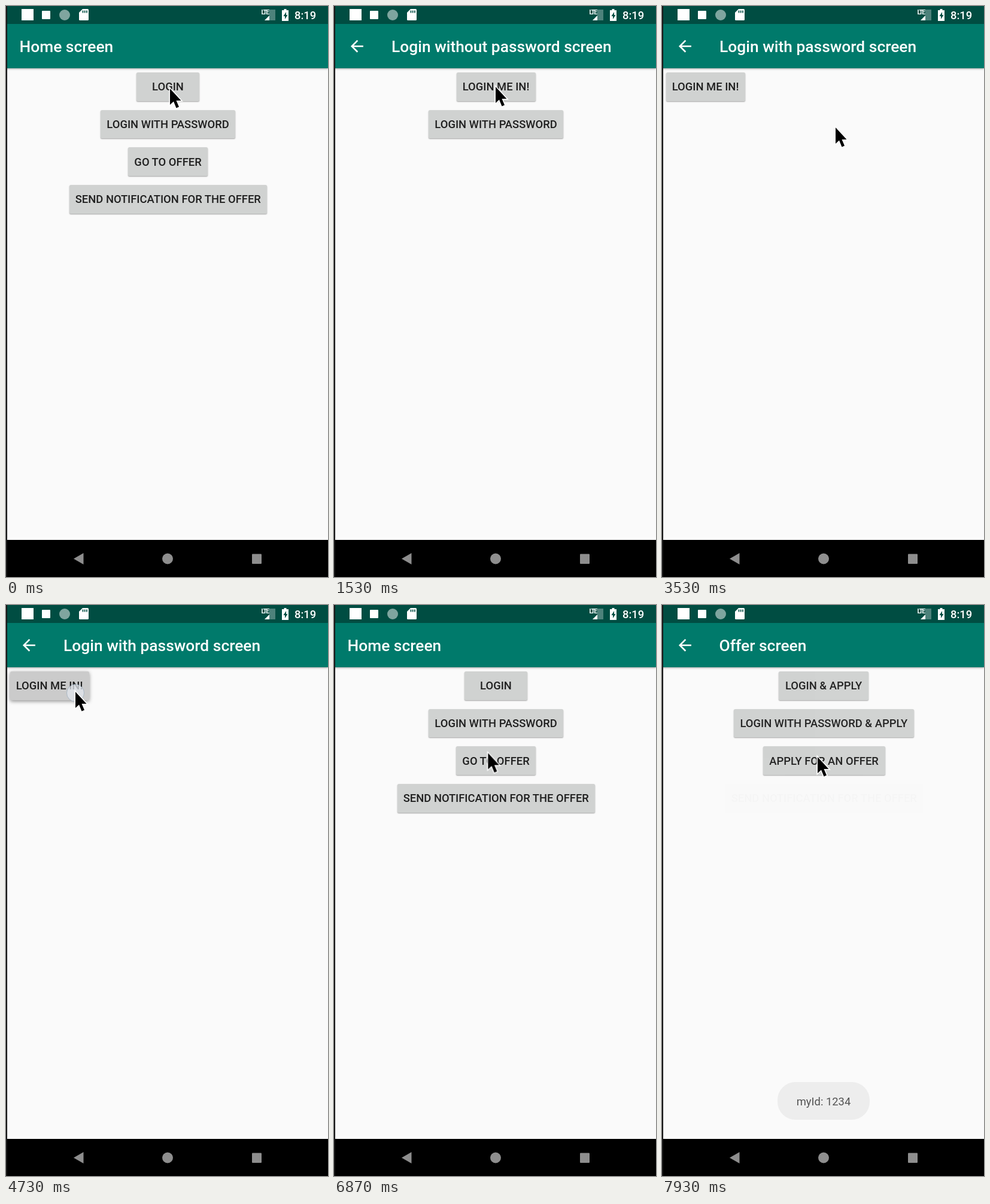
Recreate the animation shown at these times as an HTML page. Size 538 by 954 pixels, loop 8000 ms.

```html
<!DOCTYPE html>
<html lang="en">
<head>
<meta charset="utf-8">
<title>App navigation</title>
<style>
  @property --lift { syntax: "<number>"; inherits: true; initial-value: 1; }
  @property --bar-lift { syntax: "<number>"; inherits: true; initial-value: 1; }

  html, body { margin: 0; width: 100%; height: 100%; overflow: hidden; background: #fafafa; }
  #stage {
    position: relative; width: 538px; height: 954px; overflow: hidden;
    background: #fafafa; font-family: Roboto, sans-serif;
    animation: lift 8s step-end infinite;
  }
  #stage > * { position: absolute; }
  svg { left: 0; top: 0; }

  .header {
    left: 0; top: 30px; width: 538px; height: 74px; background: #007a6b;
    box-shadow: 0 1px 3px rgb(0 0 0 / calc(.36 * var(--bar-lift)));
  }

  /* Screens */
  .screen { inset: 0; animation: 8s linear infinite; }
  .home { animation-name: home; }
  .login { animation-name: login; }
  .password { animation-name: password; }
  .offer { animation-name: offer; }
  .button {
    --shadow: 0 1px 2px rgb(0 0 0 / calc(.36 * var(--lift)));
    position: absolute; left: var(--x); top: calc(111px + 62.7px * var(--row, 0));
    width: var(--w); height: 47.5px; border-radius: 2.6px;
    display: flex; align-items: center; justify-content: center;
    font-size: 18.4px; font-weight: 500; white-space: nowrap;
    color: #1f1f1f; background: #d0d2d1; box-shadow: var(--shadow);
  }
  .tapped { animation: press 8s step-end var(--at) infinite; }

  /* Titles */
  .titles text { font-size: 26.35px; font-weight: 500; fill: #fff; }
  .titles g { animation: 8s step-end infinite; }
  .titles .home { animation-name: home-title; }
  .titles .login { animation-name: login-title; }
  .titles .password { animation-name: password-title; }
  .titles .offer { animation-name: offer-title; }

  .toast {
    left: 193px; top: 797px; width: 154px; height: 63px; border-radius: 30px;
    display: flex; align-items: center; justify-content: center;
    font-size: 18.4px; color: #383838; background: #ebebeb;
    padding-top: 1px; box-sizing: border-box;
    animation: toast 8s linear infinite;
  }

  .cursor { left: 0; top: 0; animation: pointer 8s ease-in-out infinite; }
  .cursor svg { position: absolute; overflow: visible; }
  .touch { animation: touch 8s step-end infinite; }

  @keyframes lift {
    0% { --lift: 1; --bar-lift: 1; }
    11.375% { --lift: 0; --bar-lift: 1; }
    16% { --lift: 1; --bar-lift: 1; }
    35.75% { --lift: 0; --bar-lift: 0; }
    40.25% { --lift: 1; --bar-lift: 1; }
    59.75% { --lift: 0; --bar-lift: 0; }
    64.25% { --lift: 1; --bar-lift: 1; }
    94.625% { --lift: 0; --bar-lift: 0; }
    98.9%, 100% { --lift: 1; --bar-lift: 1; }
  }
  @keyframes home {
    0%, 11.375%, 64.75%, 94.625% { opacity: 1; animation-timing-function: cubic-bezier(.37, 0, .63, 1); }
    16.375%, 59.75% { opacity: 0; animation-timing-function: cubic-bezier(.37, 0, .63, 1); }
    99.625%, 100% { opacity: 0; }
  }
  @keyframes login {
    0%, 11.375%, 40.75%, 100% { opacity: 0; animation-timing-function: cubic-bezier(.37, 0, .63, 1); }
    16.375%, 35.75% { opacity: 1; animation-timing-function: cubic-bezier(.37, 0, .63, 1); }
  }
  @keyframes password {
    0%, 35.75%, 64.75%, 100% { opacity: 0; animation-timing-function: cubic-bezier(.37, 0, .63, 1); }
    40.75%, 59.75% { opacity: 1; animation-timing-function: cubic-bezier(.37, 0, .63, 1); }
  }
  @keyframes offer {
    0%, 94.625% { opacity: 0; animation-timing-function: cubic-bezier(.37, 0, .63, 1); }
    99.625%, 100% { opacity: 1; }
  }
  @keyframes home-title { 0%, 59.75% { opacity: 1; } 11.375%, 94.625%, 100% { opacity: 0; } }
  @keyframes login-title { 0%, 35.75%, 100% { opacity: 0; } 11.375% { opacity: 1; } }
  @keyframes password-title { 0%, 59.75%, 100% { opacity: 0; } 35.75% { opacity: 1; } }
  @keyframes offer-title { 0% { opacity: 0; } 94.625%, 100% { opacity: 1; } }
  @keyframes press {
    0% { background: #cbcbcb; box-shadow: 0 2px 6px rgb(0 0 0 / .42); }
    1.5%, 100% { background: #d0d2d1; box-shadow: var(--shadow); }
  }
  @keyframes toast {
    0%, 95.6% { opacity: 0; animation-timing-function: ease-out; }
    100% { opacity: .92; }
  }
  @keyframes touch {
    0%, 11.8%, 36.2%, 60.2%, 95.4%, 100% { opacity: 0; }
    9.875%, 34.25%, 58.25%, 93.125% { opacity: 1; }
  }
  @keyframes pointer {
    0% { transform: translate(274px, 138px); }
    6% { transform: translate(274px, 140px); }
    11% { transform: translate(272px, 138px); }
    18%, 22.5% { transform: translate(270px, 135px); }
    32.5% { transform: translate(290px, 204px); }
    34.25%, 36% { transform: translate(290px, 203px); }
    39.5% { transform: translate(292px, 213px); }
    43%, 44% { transform: translate(290px, 203px); }
    54% { transform: translate(118px, 146px); }
    58%, 65.5% { transform: translate(116px, 145px); }
    74%, 76.5% { transform: translate(180px, 168px); }
    86.5% { transform: translate(258px, 248px); }
    92%, 100% { transform: translate(260px, 254px); }
  }
</style>
</head>
<body>
<div id="stage">
  <div class="screen home">
    <div class="button tapped" style="--x:218px; --w:105px; --at:.79s">LOGIN</div>
    <div class="button" style="--x:158px; --w:225px; --row:1">LOGIN WITH PASSWORD</div>
    <div class="button tapped" style="--x:204px; --w:133px; --row:2; --at:7.45s">GO TO OFFER</div>
    <div class="button" style="--x:106px; --w:329.5px; --row:3">SEND NOTIFICATION FOR THE OFFER</div>
  </div>
  <div class="screen login">
    <div class="button" style="--x:204.5px; --w:132px">LOGIN ME IN!</div>
    <div class="button tapped" style="--x:158px; --w:225px; --row:1; --at:2.74s">LOGIN WITH PASSWORD</div>
  </div>
  <div class="screen password">
    <div class="button tapped" style="--x:6.5px; --w:132px; --at:4.66s">LOGIN ME IN!</div>
  </div>
  <div class="screen offer">
    <div class="button" style="--x:195px; --w:150px">LOGIN &amp; APPLY</div>
    <div class="button" style="--x:119.5px; --w:301.5px; --row:1">LOGIN WITH PASSWORD &amp; APPLY</div>
    <div class="button" style="--x:168.5px; --w:204px; --row:2">APPLY FOR AN OFFER</div>
  </div>

  <div class="header"></div>
  <svg class="titles" width="538" height="110">
    <defs>
      <path id="back" fill="#fff" transform="translate(22.7 51.5) scale(1.31)"
        d="M20 11H7.83l5.59-5.59L12 4l-8 8 8 8 1.41-1.41L7.83 13H20z"/>
    </defs>
    <g class="home"><text x="22.5" y="77">Home screen</text></g>
    <g class="login"><use href="#back"/><text x="96" y="77">Login without password screen</text></g>
    <g class="password"><use href="#back"/><text x="96" y="77">Login with password screen</text></g>
    <g class="offer"><use href="#back"/><text x="95.5" y="77">Offer screen</text></g>
  </svg>

  <div class="toast">myId: 1234</div>

  <!-- System bars -->
  <svg width="538" height="954">
    <rect width="538" height="30" fill="#004d42"/>
    <g fill="#fff">
      <rect x="26" y="5" width="20" height="19"/>
      <rect x="60" y="8" width="14" height="14" rx="1"/>
      <circle cx="98" cy="15" r="9" fill="#7fa59f"/>
      <path d="M128 5h8.500q1.500 0 1.500 1.500v16q0 1.500-1.500 1.500h-13q-1.500 0-1.500-1.500V11z"/>
      <path d="M128.500 7.500v4M131.700 7.500v4M135 7.500v4" stroke="#004d42" stroke-width="1.700"/>
      <path d="M450 6v18h-18l8-8V6z" opacity=".3"/>
      <path d="M440 16v8h-8z"/>
      <text x="426.500" y="14" font-size="10.500" font-weight="700" letter-spacing="-1.700">LTE</text>
      <path d="M464.500 7v-2h4v2h3.500v18h-11V7z"/>
      <path d="M468 10l-4.500 7h2.500v5l4.500-7h-2.500z" fill="#004d42"/>
      <text x="482" y="22" font-size="18.400" font-weight="500">8:19</text>
    </g>
    <rect y="888" width="538" height="4" fill="#fff"/>
    <rect y="892" width="538" height="62"/>
    <g fill="#8e8e8e">
      <path d="M113 923.500l16.500-9.500v19z"/>
      <circle cx="270" cy="923.500" r="9"/>
      <rect x="411" y="915.500" width="16" height="16.500" rx="1"/>
    </g>
    <rect width="2" height="954" fill="#161616"/>
  </svg>

  <div class="cursor">
    <svg width="1" height="1">
      <circle class="touch" cy="2" r="14.500" fill="#e2e6ec" fill-opacity=".75" stroke="#7f97b0" stroke-opacity=".5"/>
      <path d="M0 0V27L6 21.500L10.500 32.500L15 30.500L10.500 20H18.500z" stroke="#fff" stroke-width="3" paint-order="stroke"/>
    </svg>
  </div>
</div>
</body>
</html>
```
